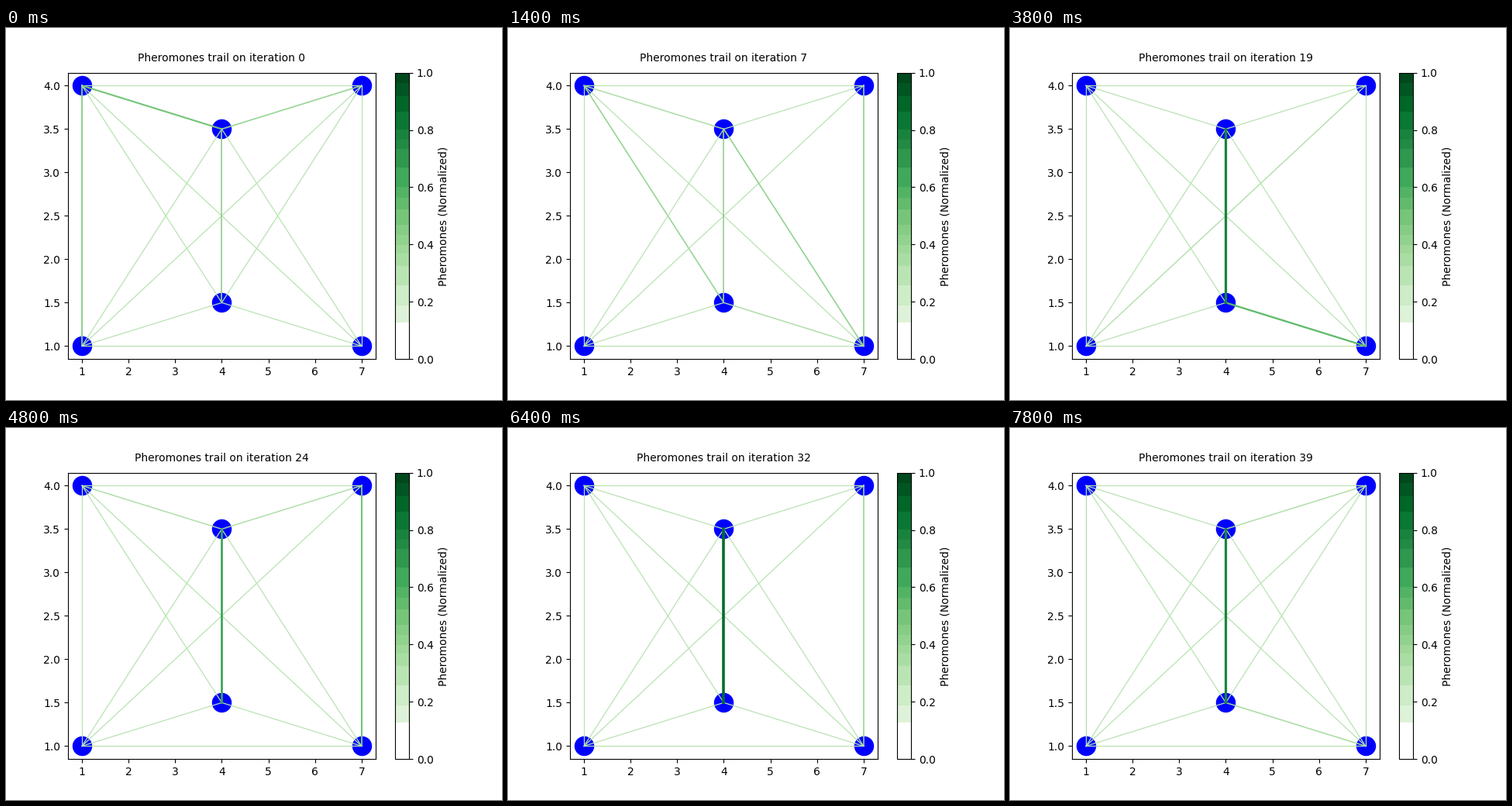
A matplotlib script that plays this animation: 640 by 480 pixels, repeating every 8000 ms.

```python
from itertools import combinations

import matplotlib.pyplot as plt
import numpy as np
from matplotlib.animation import FuncAnimation
from matplotlib.cm import ScalarMappable
from matplotlib.colors import ListedColormap, Normalize

FRAMES = 40
STEP_MS = 200
BASE = 0.3

NODES = {"A": (1, 4), "B": (1, 1), "C": (7, 4),
         "D": (7, 1), "E": (4, 3.5), "F": (4, 1.5)}

# Pheromone levels at key iterations; unlisted edges rest at BASE.
LEVELS = {
    0: dict(AE=.50, AB=.45, CE=.40, EF=.42),
    7: dict(AE=.35, AF=.40, EF=.41, DE=.41, CD=.41, DF=.34),
    14: dict(EF=.57, DF=.47, AF=.37, CD=.40),
    19: dict(EF=.78, DF=.55, BC=.33),
    24: dict(EF=.65, CD=.50, AE=.34, CE=.34),
    32: dict(EF=.87, CD=.40),
    39: dict(EF=.77, DF=.36, CE=.34, CD=.32, AB=.32),
}
HIDDEN = {"CF": range(4, 36)}

greens = plt.get_cmap("Greens")


def banded_greens():
    """Greens in flat bands, white at the low end."""
    edges = np.array([0, .129, .188, .258, .325, .366, .398, .434, .469, .523,
                      .564, .602, .669, .734, .767, .800, .865, .919, .966, 1])
    colors = greens((edges[:-1] + edges[1:]) / 2)
    colors[0] = 1
    band = np.searchsorted(edges, (np.arange(256) + 0.5) / 256) - 1
    return ListedColormap(colors[band])


def level(edge, i):
    return np.interp(i, list(LEVELS), [v.get(edge, BASE) for v in LEVELS.values()])


fig, ax = plt.subplots(figsize=(6.4, 4.8), dpi=100)
ax.scatter(*zip(*NODES.values()), s=300, color="blue")

lines = {}
for a, b in combinations(NODES, 2):
    lines[a + b], = ax.plot(*zip(NODES[a], NODES[b]))

title = ax.text(0.5, 1.05, "", transform=ax.transAxes, ha="center", va="center")
fig.colorbar(ScalarMappable(Normalize(0, 1), banded_greens()), ax=ax,
             label="Pheromones (Normalized)")


def update(i):
    for edge, line in lines.items():
        p = level(edge, i)
        line.set_color(greens(p))
        line.set_linewidth(3 * p)
        line.set_visible(i not in HIDDEN.get(edge, ()))
    title.set_text(f"Pheromones trail on iteration {i}")
    return [*lines.values(), title]


anim = FuncAnimation(fig, update, frames=FRAMES, interval=STEP_MS,
                     repeat=True, repeat_delay=0)
plt.show()
```
